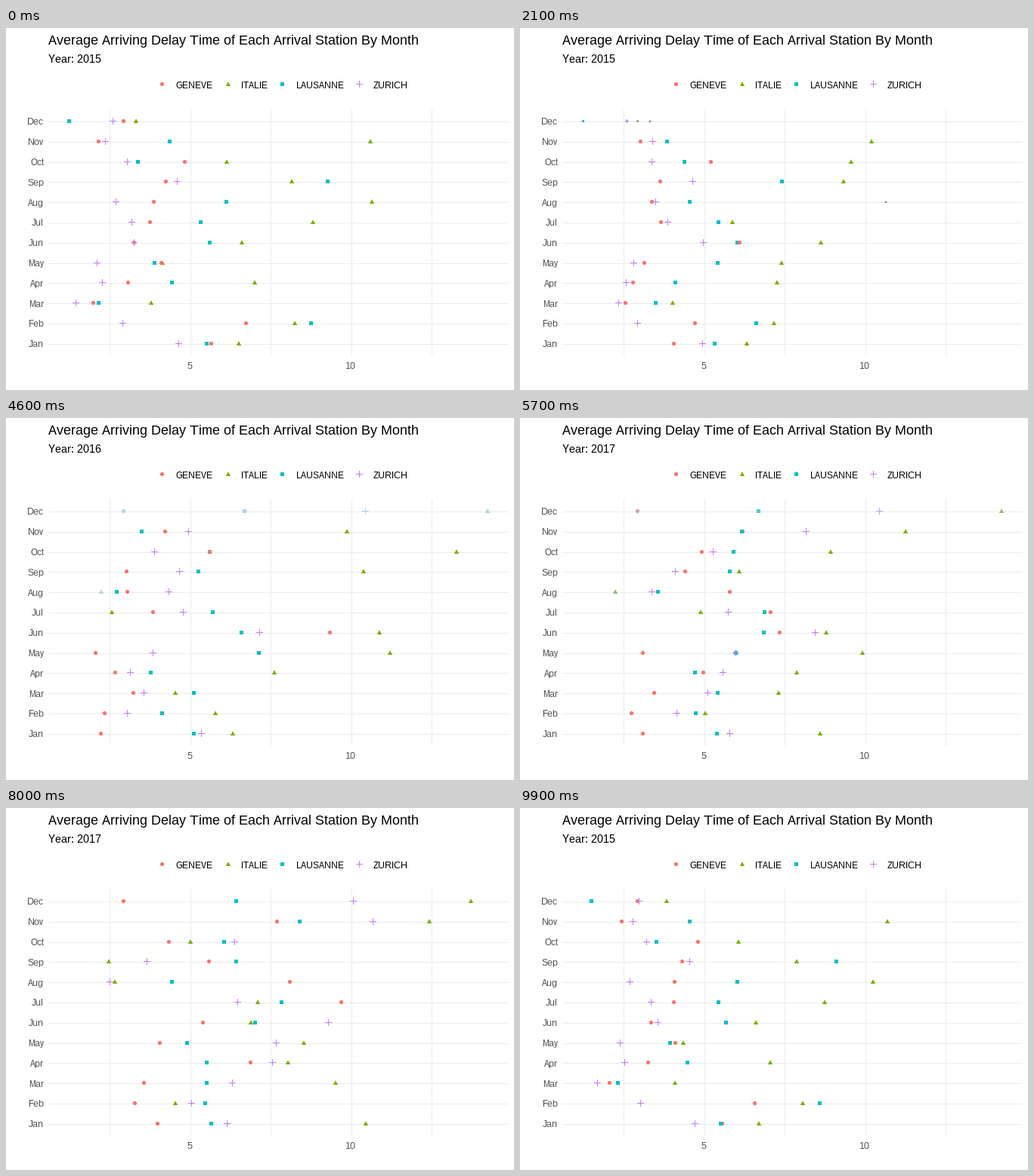
Write a matplotlib script that moves like this. It is 672x480 px and loops after 10000 ms.

```python
import numpy as np
import matplotlib.pyplot as plt
from matplotlib.animation import FuncAnimation
from matplotlib.collections import PolyCollection
from matplotlib.colors import to_rgb

W, H, DPI = 672, 480, 96
PX = 72 / DPI  # points per pixel

plt.rcParams.update({
    "font.family": "Liberation Sans",
    "text.hinting": "native",
    "text.hinting_factor": 1,
    "text.kerning_factor": 6,
})

MONTHS = ["Jan", "Feb", "Mar", "Apr", "May", "Jun",
          "Jul", "Aug", "Sep", "Oct", "Nov", "Dec"]
STATIONS = ["GENEVE", "ITALIE", "LAUSANNE", "ZURICH"]
COLORS = [np.array(to_rgb(c)) for c in ("#F8766D", "#7CAE00", "#00BFC4", "#C77CFF")]
ENTER, EXIT = np.array(to_rgb("lightblue")), np.array(to_rgb("steelblue"))
NA = np.nan

# x position in pixels: one row per month, one column per station
X2015 = np.array([
    [271, 307.5, 265.5, 228.5], [317.5, 382, 403.5, 154.5],
    [115.5, 192.5, 122.5, 92.3], [161.5, 329, 219.5, 127.5],
    [205.5, 207, 196.5, 120.5], [169.3, 311.5, 269, 169.5],
    [190.5, 406.5, 257, 166.5], [195.5, 484, 291.5, 145.5],
    [211.5, 378, 425, 226.5], [236.5, 291.5, 174.5, 160.3],
    [122.5, 482, 216, 131.5], [155.5, 171.5, 83.5, 141.3],
])
X2016 = np.array([
    [122.1, 291.7, 247.4, 256.7], [128.9, 280.4, 203.6, 156.3],
    [167.7, 213.8, 247.3, 176.5], [135.6, 353.5, 187.9, 155.0],
    [114.5, 512.5, 338.9, 186.2], [436.3, 502.1, 310.5, 331.0],
    [182.0, 131.0, 268.9, 230.7], [149.8, NA, 143.2, 219.2],
    [154.2, 489.1, 252.4, 231.1], [272.1, 612.9, 268.3, 191.1],
    [202.9, 445.6, 169.1, 229.0], [NA, NA, NA, NA],
])
X2017 = np.array([
    [196.8, 484.5, 271.8, 295.7], [163.1, 215.6, 257.0, 249.7],
    [185.9, 448.2, 272.7, 309.4], [331.6, 375.7, 267.8, 363.8],
    [203.4, 403.4, 241.7, 369.0], [265.3, 324.1, 333.0, 439.4],
    [456.2, 329.3, 369.9, 313.5], [384.5, 126.5, 215.9, 137.1],
    [271.4, 124.4, 298.0, 185.0], [214.5, 242.1, 294.2, 309.1],
    [370.3, 563.9, 397.1, 503.2], [155.5, 637.0, 315.3, 475.5],
])
STATES = [(2015, X2015), (2016, X2016), (2017, X2017)]
# first frame and length of the move out of each state
MOVES = [(11, 22), (45, 22), (79, 21)]


def row_y(i):
    return 418.3 - 26.8 * i


def mid(v):
    return np.floor(v) + 0.5


def marker(kind, x, y, s=1.0):
    """Outline of a station's marker, aligned to the pixel grid."""
    y = mid(y)
    if kind == 1:
        x = np.round(x)
        pts = np.array([(-3.2, 2.5), (3.2, 2.5), (0, -3.3)]) * s
    else:
        x = mid(x)
        if kind == 0:
            t = np.linspace(0, 2 * np.pi, 25)
            pts = 2.65 * s * np.column_stack([np.cos(t), np.sin(t)])
        elif kind == 2:
            pts = 2.5 * s * np.array([(-1, -1), (1, -1), (1, 1), (-1, 1)])
        else:
            a, b = max(4.5 * s, 0.5), 0.5
            pts = np.array([(-a, -b), (-b, -b), (-b, -a), (b, -a), (b, -b), (a, -b),
                            (a, b), (b, b), (b, a), (-b, a), (-b, b), (-a, b)])
    return pts + (x, y)


def points(verts, colors, z):
    pc = PolyCollection(verts, facecolors=colors, edgecolors="none",
                        linewidths=0, zorder=z)
    pc.set_snap(False)
    return ax.add_collection(pc, autolim=False)


def label(x, y, s, size=12, color="black", ha="left"):
    return ax.text(x, y, s, fontsize=size * PX, color=color, ha=ha, va="baseline")


fig = plt.figure(figsize=(W / DPI, H / DPI), dpi=DPI, facecolor="white")
ax = fig.add_axes([0, 0, 1, 1])
ax.set(xlim=(0, W), ylim=(H, 0))
ax.axis("off")

rows = [row_y(i) for i in range(12)]
ax.hlines(mid(np.array(rows)), 56, 664, colors="#EBEBEB", linewidths=PX, zorder=1)
ax.vlines(mid(136.9 + 106.4 * np.arange(5)), 107, 434,
          colors="#EBEBEB", linewidths=PX, zorder=1)

label(56, 22, "Average Arriving Delay Time of Each Arrival Station By Month", 18)
subtitle = label(56, 46, "", 15)
for y, m in zip(rows, MONTHS):
    label(50, y + 5, m, color="#4D4D4D", ha="right")
for x, s in ((242.7, "5"), (456, "10")):
    label(x, 452, s, color="#4D4D4D", ha="center")

for x, s in zip((224.5, 311, 384, 485.5), STATIONS):
    label(x, 80, s)
points([marker(k, x, 74.5) for k, x in enumerate((206.5, 293.5, 365.5, 467.5))],
       COLORS, 2)

dots = points([], [], 3)


def phase(f):
    """Current state, progress towards the next one, and the year shown."""
    s, p, late = 0, 0.0, False
    for k, (start, steps) in enumerate(MOVES):
        if f >= start:
            s, p, late = k, min((f - start) / steps, 1), f - start > 11
    return s, p, STATES[(s + late) % 3][0]


def draw(f):
    s, p, year = phase(f)
    now, nxt = STATES[s][1], STATES[(s + 1) % 3][1]
    verts, colors = [], []
    for i, y in enumerate(rows):
        order = (0, 1, 2, 3) if MONTHS[i] in ("Jan", "Nov") else (1, 2, 0, 3)
        for k in order:
            a, b, c, size = now[i, k], nxt[i, k], COLORS[k], 1.0
            if np.isnan(a) and np.isnan(b):
                continue
            if np.isnan(b):  # shrinks away
                if p >= 1:
                    continue
                x, c, size = a, c + (EXIT - c) * p, 1 - p
            elif np.isnan(a):  # recolours in
                if p <= 0:
                    continue
                x, c = b, ENTER + (c - ENTER) * p
            else:
                x = a + (b - a) * p
            verts.append(marker(k, x, y, size))
            colors.append(c)
    dots.set_verts(verts)
    dots.set_facecolor(colors)
    subtitle.set_text(f"Year: {year}")
    return dots, subtitle


anim = FuncAnimation(fig, draw, frames=100, interval=100, repeat=True, repeat_delay=0)
plt.show()
```
